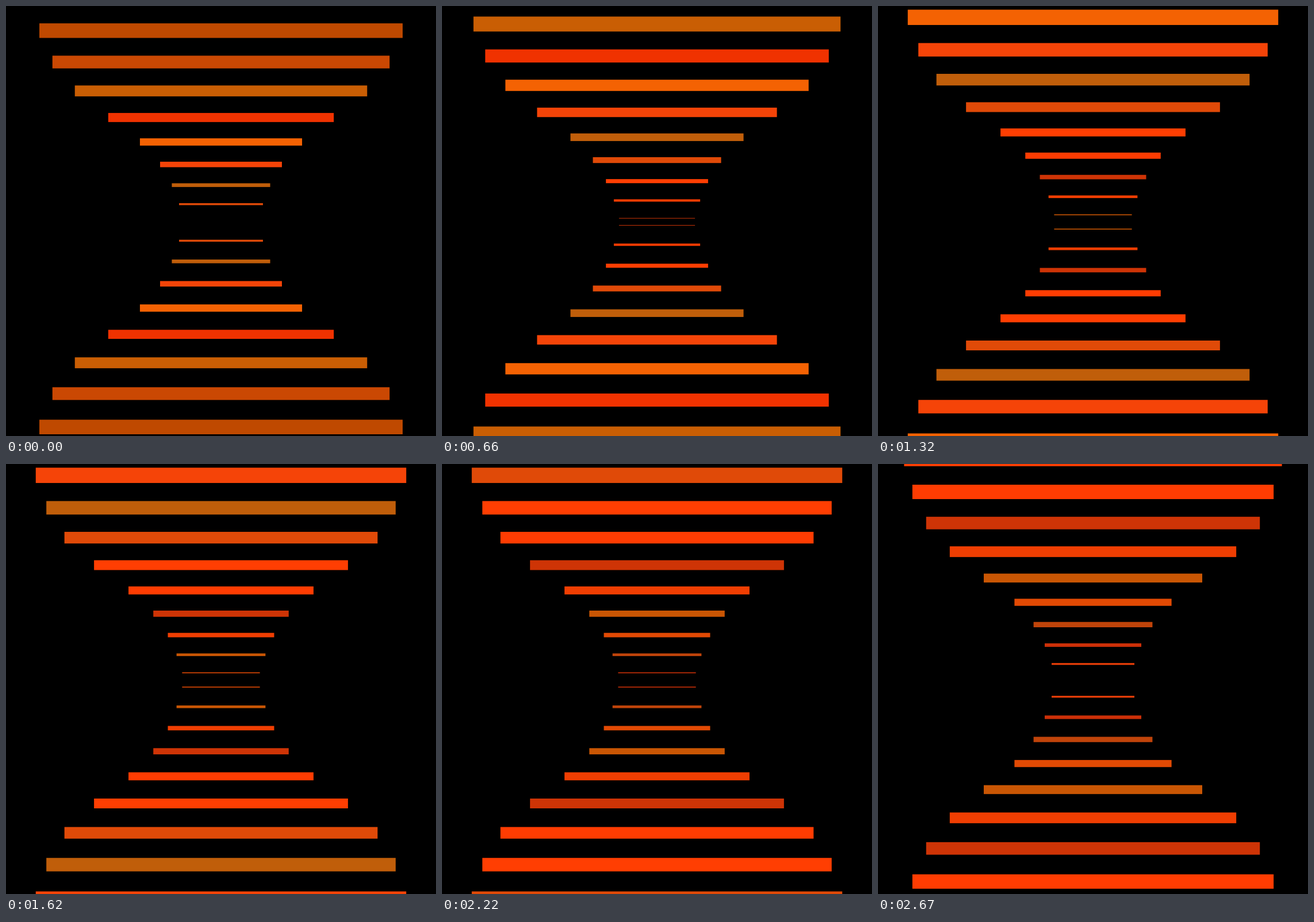
An HTML page with a canvas for the animation above (2700 ms loop, 748 by 748 pixels).

```html
<!DOCTYPE html>
<html lang="en">
<head>
<meta charset="utf-8">
<title>Bars</title>
<style>
  html, body { margin: 0; width: 100%; height: 100%; overflow: hidden; background: #000; }
  canvas { display: block; }
</style>
</head>
<body>
<canvas id="stage" width="748" height="748"></canvas>
<script>
  const SIZE = 748, LOOP = 2700, STEP = 300;
  const COLORS = [
    '#bf4900', '#ca4803', '#c95e04', '#f03200', '#f46203', '#f54408',
    '#c05e0a', '#e04a08', '#ff3e02', '#ff3c02', '#ce3406', '#f03e02',
    '#c95604', '#e24a04', '#c0440a', '#cc3008', '#f04008'
  ];
  const ctx = document.getElementById('stage').getContext('2d');

  // u grows by one per step, from the middle outwards
  const halfWidth = u => 202.4 + 111.85 * Math.atan((u - 4.1) / 1.8);
  const thickness = u => 3.4 + 3.05 * u + 0.0125 * u * u;
  const upperTop = u => 754 - 411 * Math.exp(0.08085 * u);
  const lowerBottom = u => 466 * Math.exp(0.07738 * u) - 56;

  function drawPair(u, color) {
    const w = halfWidth(u), h = thickness(u), x = SIZE / 2 - w;
    ctx.fillStyle = color;
    ctx.fillRect(x, upperTop(u), 2 * w, h);
    ctx.fillRect(x, lowerBottom(u) - h, 2 * w, h);
  }

  function draw(time) {
    const shift = (time % LOOP) / STEP;
    ctx.fillStyle = '#000';
    ctx.fillRect(0, 0, SIZE, SIZE);
    COLORS.forEach((color, i) => {
      const u = 7 - i + shift;
      if (u > -0.95 && u < 8.1) drawPair(u, color);
    });
  }

  let start = null;
  function tick(now) {
    if (start === null) start = now;
    draw(now - start);
    requestAnimationFrame(tick);
  }
  draw(0);
  requestAnimationFrame(tick);
</script>
</body>
</html>
```
